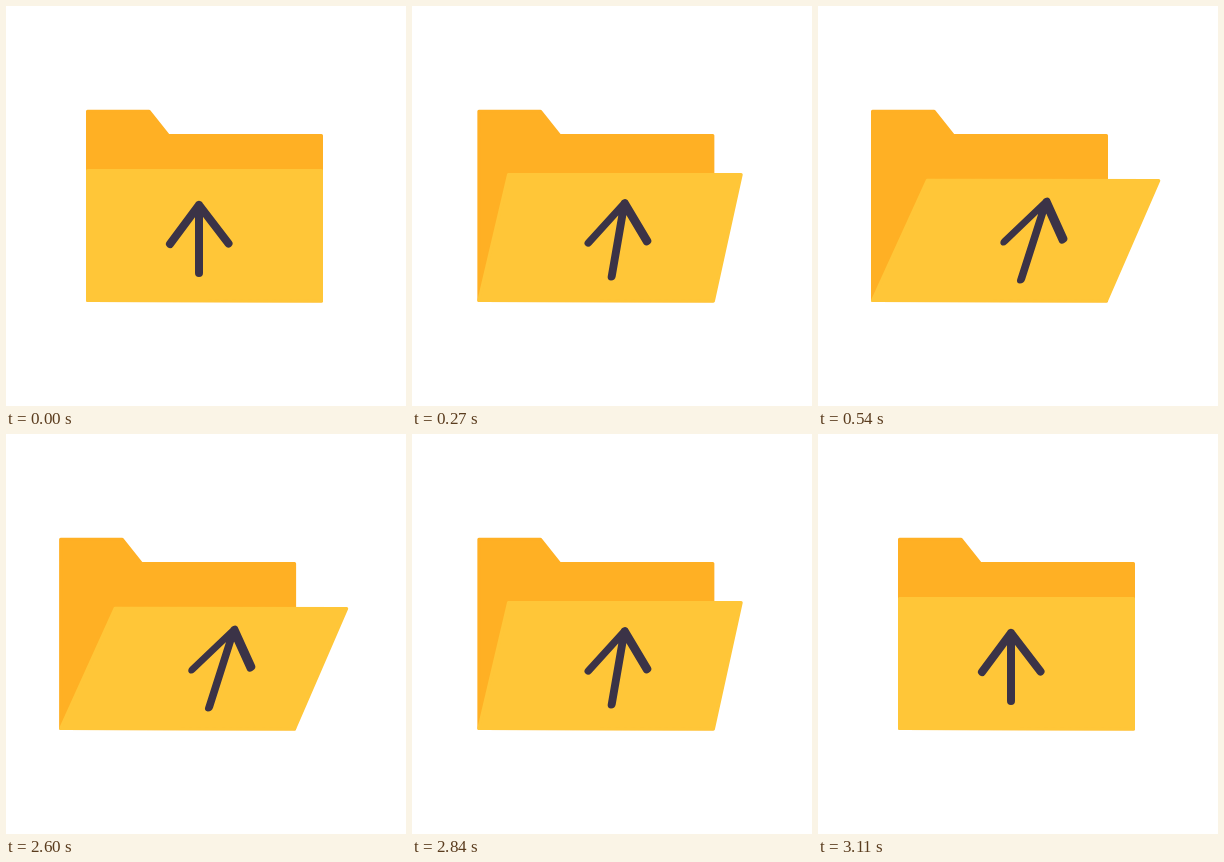
Write an HTML page that moves like this. It is 400x400 px and loops after 4140 ms.

```html
<!DOCTYPE html>
<html lang="en">
<head>
<meta charset="utf-8">
<title>Folder</title>
<style>
  html, body { margin: 0; width: 100%; height: 100%; overflow: hidden; background: #fff; }
  svg { display: block; width: 100%; height: 100%; }
  path { stroke-linecap: round; stroke-linejoin: round; }
  #back { fill: #ffb024; stroke: #ffb024; stroke-width: 3; }
  #front { fill: #ffc638; stroke: #ffc638; stroke-width: 3; }
  #arrow { fill: none; stroke: #3b3347; stroke-width: 8; }
</style>
</head>
<body>
<svg viewBox="0 0 400 400">
  <path id="back" d="M81.5 105.2H143.1L162.2 129.2L315.5 129.5V295L81.5 294.4Z"/>
  <path id="front"/>
  <path id="arrow"/>
</svg>
<script>
const LOOP = 4140, STEP = 30, STEPS = 18, CLOSE = 2570;
const [back, front, arrow] = ['back', 'front', 'arrow'].map(id => document.getElementById(id));
const mix = (a, b, p) => a + (b - a) * p;

// Cubic bezier easing (.44, 0, .5, 1), solved by bisection
function ease(x) {
  if (x <= 0 || x >= 1) return x <= 0 ? 0 : 1;
  let lo = 0, hi = 1;
  for (let i = 0; i < 30; i++) {
    const s = (lo + hi) / 2, r = 1 - s;
    if (3 * s * r * r * .44 + 3 * s * s * r * .5 + s ** 3 < x) lo = s; else hi = s;
  }
  return lo * lo * (3 - 2 * lo);
}

function openness(t) {
  const start = t < CLOSE ? 0 : CLOSE;
  const k = Math.min(STEPS, Math.floor((t - start) / STEP + 1e-4));
  return ease((start ? STEPS - k : k) / STEPS);
}

function draw(p) {
  const shift = -27 * p;
  const lag = 26 * p * (1 - p) ** 4;  // front's right side trails at first
  const top = 164.5 + 9.8 * p ** 1.5;
  back.setAttribute('transform', `translate(${shift} 0)`);
  front.setAttribute('d', `M${mix(81.5, 109.2, p)} ${top}L${mix(315.5, 340.8, p)} ${top + .3 * p}` +
    `L${315.5 + shift + lag} 295L${81.5 + shift} 294.4Z`);
  arrow.setAttribute('d', `M-29 39L0 0L29.5 38.5M0 0V${mix(68, 77.7, p)}`);
  arrow.setAttribute('transform',
    `matrix(1 ${-.02 * p} ${-.32 * p} 1 ${mix(193, 228, p) + .7 * lag} ${mix(199, 195.8, p)})`);
}

const begin = performance.now();
function frame() {
  draw(openness((performance.now() - begin) % LOOP));
  requestAnimationFrame(frame);
}
draw(0);
requestAnimationFrame(frame);
</script>
</body>
</html>
```
